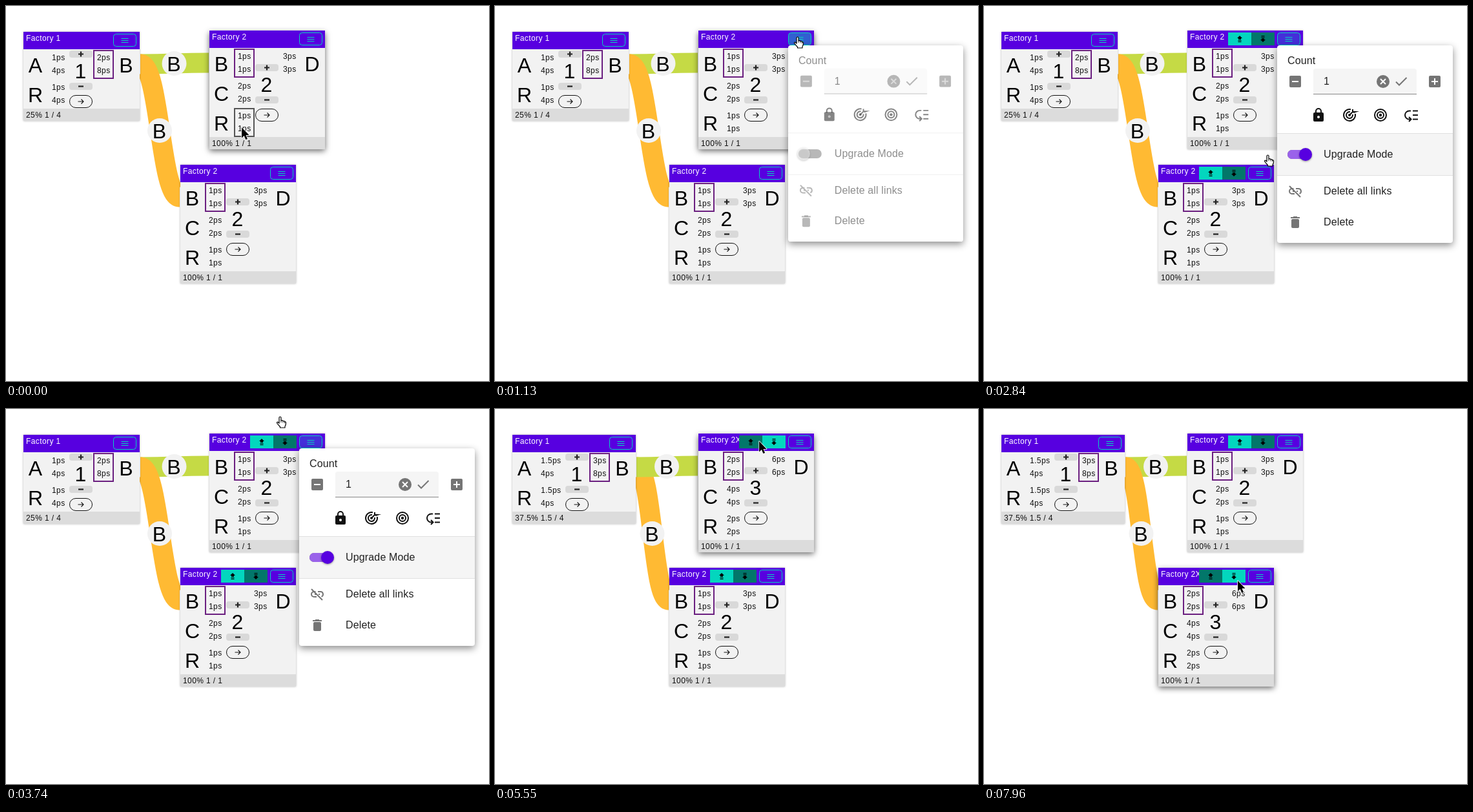
Write an HTML page with a canvas that moves like this. It is 748 px wide and 581 px high and loops after 8 s.

```html
<!DOCTYPE html>
<html lang="en">
<head>
<meta charset="utf-8">
<title>Factory planner</title>
<style>
html, body { margin: 0; width: 100%; height: 100%; overflow: hidden; background: #fff; }
canvas { display: block; }
</style>
</head>
<body>
<canvas id="stage" width="748" height="581"></canvas>
<script>
const ctx = document.getElementById('stage').getContext('2d');
const LOOP = 8000;
const PURPLE = '#5700e0', TEAL = '#03d6be', DARK_TEAL = '#02776a', GREY = '#757575', INK = '#111';
const SANS = '"Liberation Sans", Arial, sans-serif';

// Pointer stops: time, x, y
const pointerStops = [
  [0, 365, 188], [60, 365, 188], [640, 469, 48], [1560, 469, 48], [1940, 524, 237],
  [2760, 524, 237], [2840, 440, 231], [3000, 388, 232], [3200, 388, 232], [3740, 425, 12],
  [4000, 425, 12], [4470, 396, 53], [5420, 395, 53], [5710, 428, 46], [6920, 428, 46],
  [7400, 351, 258], [7780, 351, 258], [7960, 393, 266], [LOOP, 393, 266]
];
const ARROW = new Path2D('M0 0V16.5L3.7 13L6.3 19L9 17.9L6.5 12H11.5Z');
const HAND = new Path2D('M-2 1.5Q-2 0 -.5 0T1 1.5V6Q3 5 4 6.7Q6 6 6.5 7.7Q8.5 7.3 8.5 9.5Q8.5 13 7 15V17H-.5V15.5Q-4 12 -5.5 9.5Q-5.5 7.5 -3.5 8.5L-2 10Z');

const clamp = v => Math.max(0, Math.min(1, v));
const linear = (t, from, to) => clamp((t - from) / (to - from));
const ramp = (t, from, to) => { const p = linear(t, from, to); return p * p * (3 - 2 * p); };
const mix = (a, b, p) => a + (b - a) * p;

function rect(x, y, w, h, fill, radius = 0) {
  ctx.beginPath();
  ctx.roundRect(x, y, w, h, radius);
  ctx.fillStyle = fill;
  ctx.fill();
}

function frame(x, y, w, h, color, width = 1, radius = 0) {
  ctx.beginPath();
  ctx.roundRect(x, y, w, h, radius);
  ctx.strokeStyle = color;
  ctx.lineWidth = width;
  ctx.stroke();
}

function disc(x, y, r, fill) {
  ctx.beginPath();
  ctx.arc(x, y, r, 0, Math.PI * 2);
  ctx.fillStyle = fill;
  ctx.fill();
}

function text(str, x, y, size, color = INK, align = 'left', spacing = 0) {
  ctx.font = `${size}px ${SANS}`;
  ctx.letterSpacing = spacing + 'px';
  ctx.textAlign = align;
  ctx.fillStyle = color;
  ctx.fillText(str, x, y);
}
const small = (str, x, y, color) => text(str, x, y, 12, color, 'left', 0.4);
const big = (str, x, y) => text(str, x, y, 32, '#000', 'center');

// Stroked path centred on (x, y)
function icon(x, y, d, color, width = 2) {
  ctx.save();
  ctx.translate(x, y);
  ctx.strokeStyle = color;
  ctx.lineWidth = width;
  ctx.stroke(new Path2D(d));
  ctx.restore();
}

function withShadow(color, blur, dy, draw) {
  ctx.save();
  ctx.shadowColor = color;
  ctx.shadowBlur = blur;
  ctx.shadowOffsetY = dy;
  draw();
  ctx.restore();
}

function link(x1, y1, x2, y2, color) {
  const mx = (x1 + x2) / 2, my = (y1 + y2) / 2;
  icon(0, 0, `M${x1} ${y1}C${mx} ${y1} ${mx} ${y2} ${x2} ${y2}`, color, 31);
  disc(mx - 0.5, my, 19, '#f2f2f2');
  big('B', mx - 1, my + 12);
}

function upgradeButton(x, y, active, dir) {
  rect(x, y, 36, 20, active ? TEAL : DARK_TEAL);
  ctx.save();
  ctx.translate(x + 18, y + 10);
  ctx.scale(1, dir);
  ctx.fillStyle = '#000';
  ctx.fill(new Path2D('M0 -5L4 -1H2V1H-2V-1H-4Z'));
  ctx.fillRect(-2.5, 2, 5, 1);
  ctx.fillRect(-2.5, 4, 5, 1);
  ctx.restore();
}

function card(c) {
  const { x, y, rows, extra = 0, hover = 0, glow = 0 } = c;
  const w = c.w + extra, h = 46 * (rows.length + 1);
  withShadow(`rgba(0,0,0,${0.3 + 0.3 * hover})`, 3 + 6 * hover, 2.5 * hover, () => rect(x, y, w, h, '#f2f2f2'));
  rect(x, y, w, 27, PURPLE);
  small(c.title, x + 4, y + 14, '#fff');
  if (c.upgradable) {
    upgradeButton(x + 63, y + 3, !c.upgraded, 1);
    upgradeButton(x + 99, y + 3, c.upgraded, -1);
  }

  const mx = x + 139 + extra;
  rect(mx + 0.5, y + 3.5, 35, 19, `rgba(3,214,190,${glow})`, 4);
  frame(mx + 0.5, y + 3.5, 35, 19, TEAL, 1, 4);
  icon(mx + 18, y + 13.5, 'M-5.5 -3H5.5M-5.5 0H5.5M-5.5 3H5.5', TEAL, 1);

  rows.forEach(([name, need, have], i) => {
    big(name, x + 18.5, y + 63 + 46 * i);
    small(need, x + 44, y + 44 + 46 * i);
    small(have, x + 44, y + 64 + 46 * i);
  });

  const cx = x + 89 + extra, top = y + 29 + 23 * (rows.length - 2);
  rect(cx - 18, top, 36, 11, '#d9d9d9', 4);
  icon(cx, top + 5.5, 'M-4 0H4M0 -4V4', '#222', 2.2);
  big(c.level, cx - 0.5, top + 43);
  rect(cx - 18, top + 50, 36, 11, '#d9d9d9', 4);
  icon(cx, top + 55.5, 'M-4 0H4', '#222', 2.2);
  frame(cx - 17.5, top + 69.5, 35, 19, INK, 1, 9.5);
  icon(cx, top + 79, 'M-4.5 0H4M.5 -3.5L4 0L.5 3.5', INK, 1.1);

  const [name, make, max] = c.output;
  small(make, x + 114 + extra, y + 44);
  small(max, x + 114 + extra, y + 64);
  big(name, x + 159 + extra, y + 63);

  frame(x + c.boxX + (c.boxX > 100 ? extra : 0), y + 29, 30, 43, '#6b1f80', 2);
  if (c.focusRow) frame(x + 39, y + 121, 30, 43, '#555', 2);

  rect(x, y + h - 19, w, 19, '#dcdcdc');
  small(c.status, x + 4, y + h - 5);
}

function secondFactory(x, y, upgraded, options) {
  const n = upgraded ? 2 : 1, ps = v => v * n + 'ps';
  card({
    x, y, w: 179, upgraded, boxX: 39,
    title: upgraded ? 'Factory 2X' : 'Factory 2',
    rows: [['B', ps(1), ps(1)], ['C', ps(2), ps(2)], ['R', ps(1), ps(1)]],
    output: ['D', ps(3), ps(3)],
    level: upgraded ? '3' : '2',
    status: '100% 1 / 1',
    ...options
  });
}

function targetIcon(x, y) {
  icon(x, y, 'M9 0A9 9 0 1 1 -9 0A9 9 0 1 1 9 0M5 0A5 5 0 1 1 -5 0A5 5 0 1 1 5 0', INK);
  disc(x, y, 2.2, INK);
}

function menuIcons() {
  for (const x of [482, 698]) rect(x - 9, 108, 18, 18, GREY, 2);
  icon(482, 117, 'M-5 0H5', '#fff');
  icon(698, 117, 'M-5 0H5M0 -5V5', '#fff');
  disc(618, 117, 10, GREY);
  icon(618, 117, 'M-4 -4L4 4M4 -4L-4 4', '#fff');
  icon(646, 117, 'M-8 .5L-3 5.5L8.5 -6', GREY);

  rect(510, 165, 16, 14, INK, 2);
  icon(518, 169, 'M-4 -3V-6A4 4 0 0 1 4 -6V-3', INK);
  disc(518, 172, 2, '#fff');

  icon(566, 169, 'M2 -8.8A9 9 0 1 0 8.8 -2M1 -4.9A5 5 0 1 0 4.9 -1M0 0L6 -6M5 -9V-5H9L6 -4', INK);
  disc(566, 169, 2, INK);
  targetIcon(614, 169);
  icon(662, 169, 'M2 -6.5H10M2 0H10M2 6.5H10M-1 -6.5H-3.5A6.5 6.5 0 0 0 -3.5 6.5H-2M-4 3L-.5 6.5L-4 10', INK);

  icon(482, 287, 'M-2.5 -4H-5A4 4 0 0 0 -5 4H-1M1 -4H5A4 4 0 0 1 6.5 3.7M-4 0H-1M2 0H4M-9 -8L8 9', GREY);
  rect(476, 330, 12, 14, GREY, 2);
  rect(475, 327, 14, 2, GREY);
  rect(479, 326, 6, 2, GREY);
}

function toggle(t) {
  const on = ramp(t, 2300, 2430);
  rect(470, 223, 36, 14, GREY, 7);
  ctx.save();
  ctx.globalAlpha *= on;
  rect(470, 223, 36, 14, '#9a62ea', 7);
  ctx.restore();
  withShadow('rgba(0,0,0,.4)', 3, 1, () => disc(mix(478, 498, on), 230, 10, on > 0.5 ? PURPLE : '#fff'));
}

function menu(t) {
  const fade = 1 - linear(t, 3910, 4130);
  const open = linear(t, 930, 1320);
  if (!open || !fade) return;
  const grow = (1 - (1 - linear(t, 930, 1195)) ** 3) * mix(0.4, 1, fade);

  ctx.save();
  ctx.translate(454, 61);
  ctx.scale(mix(0.75, 1, grow), mix(0.5625, 1, grow));
  ctx.translate(-454, -61);
  ctx.globalAlpha = Math.min(1, open * 2) * fade;
  withShadow('rgba(0,0,0,.45)', 12, 4, () => rect(454, 61, 272, 306, '#fff', 4));
  ctx.globalAlpha = open * fade;

  if (t > 1860) rect(454, 198, 272, 64, '#f5f5f5');
  rect(454, 197, 272, 1, '#e0e0e0');
  rect(454, 262, 272, 1, '#e0e0e0');
  rect(510, 97, 160, 39, '#f5f5f5', [4, 4, 0, 0]);
  rect(510, 136, 160, 1, '#888');

  const label = (str, x, y) => text(str, x, y, 16, '#212121', 'left', 0.15);
  label('Count', 470, 90);
  label('1', 526, 122);
  label('Upgrade Mode', 526, 235);
  label('Delete all links', 526, 292);
  label('Delete', 526, 340);
  menuIcons();
  toggle(t);

  if (t >= 2180 && t < 2590) {
    const p = linear(t, 2190, 2350);
    ctx.beginPath();
    ctx.rect(454, 198, 272, 64);
    ctx.clip();
    disc(mix(563, 590, p), mix(233, 230, p), mix(100, 150, p), `rgba(0,0,0,${0.2 * (1 - linear(t, 2350, 2590))})`);
  }
  ctx.restore();
}

function pointer(t) {
  const i = pointerStops.findIndex(s => s[0] > t);
  const [t0, x0, y0] = pointerStops[i - 1], [t1, x1, y1] = pointerStops[i];
  const p = ramp(t, t0, t1), hand = t >= 540 && t < 4630;
  ctx.save();
  ctx.translate(mix(x0, x1, p), mix(y0, y1, p));
  ctx.lineJoin = 'round';
  ctx.lineWidth = hand ? 1.2 : 1.6;
  ctx.strokeStyle = hand ? '#000' : '#fff';
  ctx.fillStyle = hand ? '#fff' : '#000';
  if (hand) {
    ctx.fill(HAND);
    ctx.stroke(HAND);
    icon(0, 0, 'M1 6V9M4 7V9.5M6.5 8V10', '#000', 0.8);
  } else {
    ctx.stroke(ARROW);
    ctx.fill(ARROW);
  }
  ctx.restore();
}

function draw(t) {
  ctx.fillStyle = '#fff';
  ctx.fillRect(0, 0, 748, 581);

  const boosted = t >= 5050 && t < 6640 || t >= 7880;
  const extra = boosted ? 11 : 0;
  const links = [
    () => link(208 + extra, 90, 314, 88, '#c5da45'),
    () => link(208 + extra, 90, 269, 296, '#ffba33')
  ];
  if (t >= 5050 && t < 7880) links.reverse();
  links.forEach(paint => paint());

  const need = boosted ? '1.5ps' : '1ps';
  card({
    x: 27, y: 40, w: 180, extra, title: 'Factory 1', boxX: 109, level: '1',
    rows: [['A', need, '4ps'], ['R', need, '4ps']],
    output: ['B', boosted ? '3ps' : '2ps', '8ps'],
    status: boosted ? '37.5% 1.5 / 4' : '25% 1 / 4'
  });

  const upgradable = t >= 2430;
  const glow = 0.08 * ramp(t, 500, 620) + 0.37 * ramp(t, 810, 1000)
    - 0.23 * ramp(t, 1200, 1500) - 0.22 * ramp(t, 3910, 4100);
  secondFactory(315, 38, t >= 4840 && t < 6340, {
    upgradable, glow: Math.max(0, glow), focusRow: t < 200,
    hover: 1 - ramp(t, 1620, 1800) + ramp(t, 4150, 4400) - ramp(t, 7140, 7340)
  });
  secondFactory(270, 246, t >= 7580, { upgradable, hover: ramp(t, 7220, 7450) });

  menu(t);
  pointer(t);
}

const start = performance.now();
function tick() {
  draw((performance.now() - start) % LOOP);
  requestAnimationFrame(tick);
}
tick();
</script>
</body>
</html>
```
